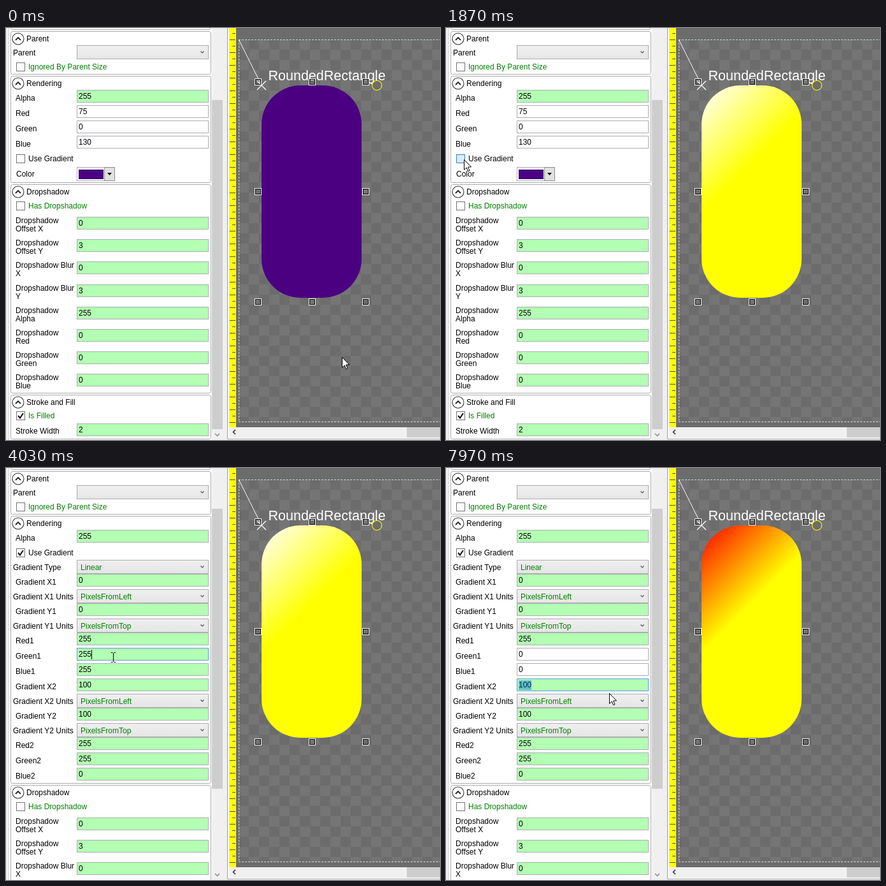
Write an HTML page with a canvas that moves like this. It is 681 px wide and 646 px high and loops after 8 s.

```html
<!DOCTYPE html>
<html lang="en">
<head>
<meta charset="utf-8">
<title>Gradient settings</title>
<style>
  html, body { margin: 0; width: 100%; height: 100%; overflow: hidden; background: #fff; }
  canvas { display: block; }
</style>
</head>
<body>
<canvas id="stage" width="681" height="646"></canvas>
<script>
const ctx = document.getElementById('stage').getContext('2d');
const LOOP = 8000;
const GREEN = '#b3ffb3', LABEL_GREEN = '#008000', FONT = '"Liberation Sans", Arial, sans-serif';

// Mouse path: each move is [start, end, x, y]; the pointer rests in between.
const START = [527, 516];
const MOVES = [
  [30, 830, 47, 216], [870, 1330, 28, 206], [2800, 3600, 145, 261],
  [3600, 3870, 168, 297], [7070, 7330, 172, 306], [7600, 7970, 256, 353],
];

function ease(k) {
  const u = 1 - (1 - k) ** 1.58;
  return u * u * (3 - 2 * u);
}

function mouseAt(t) {
  let [x, y] = START;
  for (const [from, to, nx, ny] of MOVES) {
    if (t < from) break;
    const k = ease(Math.min(1, (t - from) / (to - from)));
    x += (nx - x) * k;
    y += (ny - y) * k;
  }
  return { x: Math.round(x), y: Math.round(y) };
}

let time = 0, mouse = { x: 0, y: 0 }, overField = false;

const hit = (x, y, w, h) =>
  mouse.x >= x && mouse.x < x + w && mouse.y >= y && mouse.y < y + h;

function fill(color, x, y, w, h) {
  ctx.fillStyle = color;
  ctx.fillRect(x, y, w, h);
}

function box(x, y, w, h, color, border) {
  if (color) fill(color, x, y, w, h);
  ctx.strokeStyle = border;
  ctx.lineWidth = 1;
  ctx.strokeRect(x + .5, y + .5, w - 1, h - 1);
}

function text(str, x, y, color = '#000', size = 12) {
  ctx.font = `${size}px ${FONT}`;
  ctx.fillStyle = color;
  ctx.fillText(str, x, y);
}

function line(color, width, ...pts) {
  ctx.strokeStyle = color;
  ctx.lineWidth = width;
  ctx.beginPath();
  for (let i = 0; i < pts.length; i += 2) ctx.lineTo(pts[i], pts[i + 1]);
  ctx.stroke();
}

function circle(x, y, r, color, border, width) {
  ctx.beginPath();
  ctx.arc(x, y, r, 0, 7);
  if (color) { ctx.fillStyle = color; ctx.fill(); }
  ctx.strokeStyle = border;
  ctx.lineWidth = width;
  ctx.stroke();
}

function group(title, top, bottom) {
  ctx.strokeStyle = '#a9a9a9';
  ctx.lineWidth = 1;
  ctx.beginPath();
  ctx.roundRect(7.5, top + .5, 314, bottom - top - 1, 3);
  ctx.stroke();
  const y = top + 12, hover = hit(9, top + 2, 309, 20);
  circle(19, y, 9, hover ? '#f3f9ff' : '#fff', hover ? '#5593ff' : '#333', 1.1);
  line('#222', 1.8, 15, y + 2, 19, y - 2, 23, y + 2);
  text(title, 32, y + 4);
}

function checkbox(label, y, checked, color, pressed) {
  const hover = hit(16, y - 7, 92, 14);
  box(16, y - 7, 14, 14, pressed ? '#d9ecff' : hover ? '#f3f9ff' : '#fff',
    pressed ? '#3c77dd' : hover ? '#5593ff' : '#707070');
  if (checked) line('#111', 2, 19, y, 22, y + 3.5, 27, y - 4);
  text(label, 35, y + 4, color);
}

function field(top, value, { set, focus, selected, caret } = {}) {
  const hover = hit(111, top + 2, 207, 19);
  overField ||= hover;
  box(111, top, 207, 20, set ? '#fff' : GREEN, focus ? '#569de5' : hover ? '#7eb4ea' : '#abadb3');
  text(value, 114, top + 14);
  const width = ctx.measureText(value).width;
  if (selected) fill('rgba(0,110,220,.45)', 114, top + 3, width, 15);
  if (caret) fill('#000', 114 + Math.round(width), top + 3, 1, 15);
}

function fieldRow(label, top, value, state) {
  text(label, 15, top + 17);
  field(top, value, state);
}

function combo(label, top, value = '') {
  const hover = hit(111, top, 207, 24);
  const shade = ctx.createLinearGradient(0, top, 0, top + 22);
  shade.addColorStop(0, hover ? '#ecf4fc' : '#f0f0f0');
  shade.addColorStop(1, hover ? '#dcecfc' : '#e5e5e5');
  box(111, top, 207, 22, shade, hover ? '#7eb4ea' : '#acacac');
  line(hover ? '#000' : '#606060', 1.4, 305.5, top + 9.5, 308, top + 12, 310.5, top + 9.5);
  text(label, 11, top + 16);
  text(value, 117, top + 16, LABEL_GREEN);
}

function solidRows() {
  ['75', '0', '130'].forEach((value, i) =>
    fieldRow(['Red', 'Green', 'Blue'][i], 121 + 24 * i, value, { set: true }));
  checkbox('Use Gradient', 205, false, '#000', time >= 1500);
  text('Color', 16, 233);
  box(111, 218, 60, 22, '#fff', '#acacac');
  box(114, 222, 39, 15, '#4b0082', '#3a0066');
  box(154, 218, 17, 22, '#e1e1e1', '#8a8a8a');
  ctx.fillStyle = '#000';
  ctx.beginPath();
  ctx.moveTo(159, 227); ctx.lineTo(166, 227); ctx.lineTo(162.5, 231);
  ctx.fill();
}

function gradientRows() {
  const t = time;
  checkbox('Use Gradient', 133, true);
  combo('Gradient Type', 144, 'Linear');
  [1, 2].forEach((n) => {
    const y = n === 1 ? 166 : 330, size = n === 1 ? '0' : '100';
    const tabbed = n === 2 && t >= 7630;
    fieldRow('Gradient X' + n, y, size, { focus: tabbed, selected: tabbed });
    combo(`Gradient X${n} Units`, y + 24, 'PixelsFromLeft');
    fieldRow('Gradient Y' + n, y + 46, size);
    combo(`Gradient Y${n} Units`, y + 70, 'PixelsFromTop');
    fieldRow('Red' + n, y + 92, '255');
  });
  const inGreen = t >= 4030 && t < 5200, inBlue = t >= 5200 && t < 7630;
  fieldRow('Green1', 282, t < 4900 ? '255' : '0', {
    set: t >= 5200, focus: inGreen,
    selected: inGreen && t >= 4230 && t < 4900,
    caret: inGreen && (t < 4230 || t >= 4900),
  });
  fieldRow('Blue1', 306, t < 5800 ? '255' : '0', {
    set: t >= 7630, focus: inBlue,
    selected: inBlue && t < 5800,
    caret: inBlue && t >= 5800 && !(t >= 6370 && t < 6830) && t < 7330,
  });
  fieldRow('Green2', 446, '255');
  fieldRow('Blue2', 470, '0');
}

function dropshadow(dy) {
  group('Dropshadow', 245 + dy, 573 + dy);
  checkbox('Has Dropshadow', 279 + dy, false, LABEL_GREEN);
  const values = ['0', '3', '0', '3', '255', '0', '0', '0'];
  ['Offset X', 'Offset Y', 'Blur X', 'Blur Y', 'Alpha', 'Red', 'Green', 'Blue'].forEach((name, i) => {
    const top = 296 + dy + Math.round(35.2 * i);
    const blur = name.startsWith('Blur ');
    text(blur ? 'Dropshadow Blur' : 'Dropshadow', 15, top + 10);
    text(blur ? name.slice(5) : name, 15, top + 23);
    field(top, values[i]);
  });
}

function panel(expanded) {
  fill('#fff', 0, 0, 347, 646);
  fill('#f0f0f0', 0, 0, 4, 646);
  fill('#d5d5d5', 4, 0, 1, 646);
  ctx.strokeStyle = '#a9a9a9';
  ctx.lineWidth = 1;
  ctx.beginPath();
  ctx.roundRect(7.5, -20.5, 314, 23, 3);
  ctx.stroke();

  group('Parent', 5, 73);
  combo('Parent', 27);
  checkbox('Ignored By Parent Size', 61, false, LABEL_GREEN);

  group('Rendering', 75, expanded ? 495 : 243);
  fieldRow('Alpha', 97, '255');
  if (expanded) gradientRows(); else solidRows();
  dropshadow(expanded ? 252 : 0);
  if (!expanded) {
    group('Stroke and Fill', 575, 645);
    checkbox('Is Filled', 608, true, LABEL_GREEN);
    text('Stroke Width', 15, 636);
    field(620, '2');
  }

  const onBar = hit(323, 0, 17, 646);
  fill('#f0f0f0', 323, 0, 17, 646);
  const [top, bottom] = expanded ? [64, 503] : [113, 629];
  fill(onBar ? '#a6a6a6' : '#cdcdcd', 323, top, 17, bottom - top);
  line(onBar ? '#000' : '#808080', 1.3, 328, 636, 331.5, 639.5, 335, 636);
}

function ruler() {
  fill('#fff', 340, 0, 341, 646);
  fill('#f0f0f0', 340, 0, 7, 646);
  fill('#a0a0a0', 347, 0, 1, 644);
  fill('#ffff00', 350, 0, 11, 626);
  for (let i = -1; i < 61; i++) {
    const length = i % 2 ? 5 : 9;
    fill('#555500', 360 - length, 18 + i * 10, length, 1);
  }
}

function checkers() {
  fill('#6c6c6c', 361, 0, 320, 626);
  ctx.save();
  ctx.beginPath();
  ctx.rect(365, 18, 316, 600);
  ctx.clip();
  for (let row = 0; row < 38; row++)
    for (let col = 0; col < 20; col++)
      fill((row + col) % 2 ? '#6c6c6c' : '#757575', 365 + col * 16, 18 + row * 16, 16, 16);
  ctx.restore();
  ctx.setLineDash([3, 2]);
  line('#b5dfe3', 1, 365, 18.5, 681, 18.5);
  line('#d8d8d8', 1, 365.5, 18, 365.5, 617);
  line('#d8d8d8', 1, 365, 617.5, 681, 617.5);
  ctx.setLineDash([]);
}

function shapeFill() {
  if (time < 1870) return '#4b0082';
  const blend = ctx.createLinearGradient(401, 90, 501, 190);
  blend.addColorStop(0, time < 5200 ? '#fff' : time < 7630 ? '#f0f' : '#f00');
  blend.addColorStop(1, '#ff0');
  return blend;
}

function editor() {
  ruler();
  checkers();
  ctx.fillStyle = shapeFill();
  ctx.beginPath();
  ctx.roundRect(401, 90, 157, 333, 61);
  ctx.fill();

  line('#fff', 1, 365.5, 18.5, 401, 90);
  line('#fff', 1.2, 394, 83, 408, 97);
  line('#fff', 1.2, 394, 97, 408, 83);
  text('RoundedRectangle', 411.5, 82, '#fff', 21.5);
  for (const x of [395, 480, 564])
    for (const y of [84, 256, 429]) {
      if (x === 480 && y === 256) continue;
      box(x - 5, y - 5, 11, 11, null, '#fff');
      box(x - 4, y - 4, 9, 9, null, '#000');
    }
  line('#fff', 1, 570, 86, 575, 88);
  circle(582, 90, 7.5, null, '#ff0', 1.1);

  fill('#f0f0f0', 350, 626, 331, 17);
  fill('#cdcdcd', 629, 626, 52, 16);
  line('#333', 1.6, 360, 630, 356.5, 633.5, 360, 637);
  fill('#a0a0a0', 347, 644, 334, 1);
}

function cursor() {
  const { x, y } = mouse;
  if (overField) {
    line('#000', 1, x - 3, y - 7.5, x - .5, y - 7.5);
    line('#000', 1, x + 1.5, y - 7.5, x + 4, y - 7.5);
    line('#000', 1, x + .5, y - 7, x + .5, y + 7);
    line('#000', 1, x - 3, y + 7.5, x - .5, y + 7.5);
    line('#000', 1, x + 1.5, y + 7.5, x + 4, y + 7.5);
    return;
  }
  ctx.save();
  ctx.translate(x + .5, y + .5);
  ctx.beginPath();
  for (const [px, py] of [[0, 0], [0, 16], [3.7, 12.5], [6.2, 18.2], [8.5, 17.2], [6, 11.6], [11, 11.3]])
    ctx.lineTo(px, py);
  ctx.closePath();
  ctx.fillStyle = '#fff';
  ctx.fill();
  ctx.strokeStyle = '#000';
  ctx.lineWidth = 1;
  ctx.stroke();
  ctx.restore();
}

function draw(now) {
  time = now % LOOP;
  mouse = mouseAt(time);
  overField = false;
  panel(time >= 1900);
  editor();
  cursor();
}

const start = performance.now();
function tick() {
  draw(performance.now() - start);
  requestAnimationFrame(tick);
}
tick();
</script>
</body>
</html>
```
